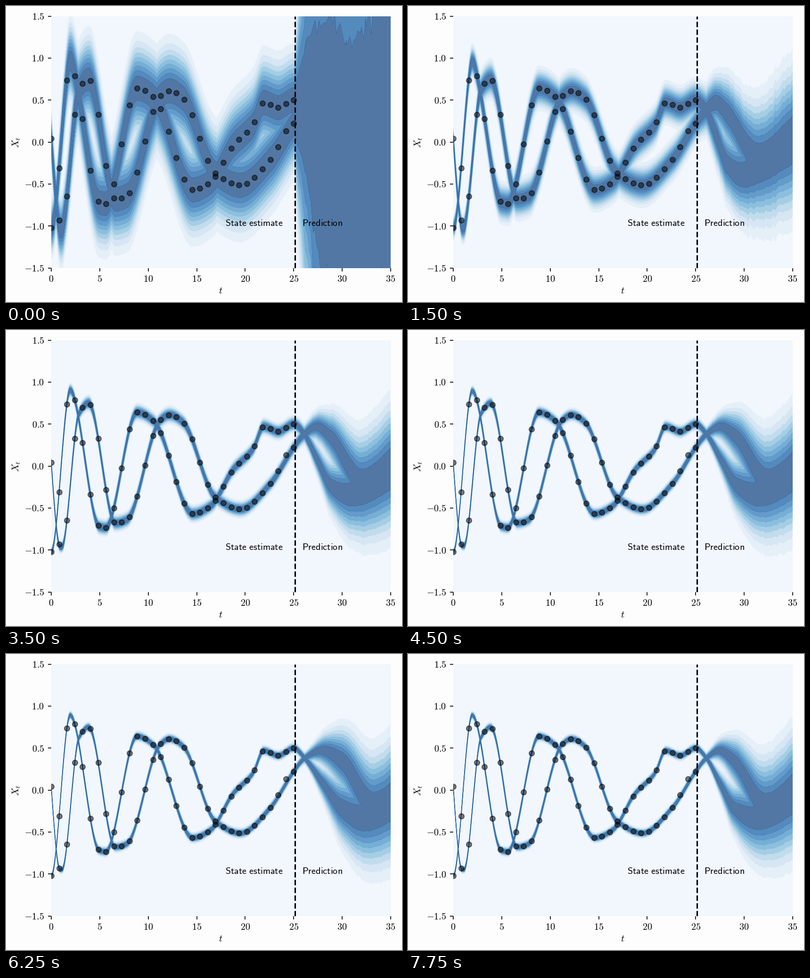
These frames come from a looping animation (840x630 px, 8000 ms). A matplotlib script:

```python
import numpy as np
import matplotlib.pyplot as plt
from matplotlib.animation import FuncAnimation
from matplotlib.collections import PolyCollection

FRAMES, STEP_MS = 32, 250
NOW, SPLIT, END = 25, 25.13, 35
LEVELS = np.arange(1, 10) / 10
plt.rcParams.update({"mathtext.fontset": "cm", "font.size": 9.7})

# Turning points (t, x) of the two tracks, then of their forecasts
TRACK_A = [(-.85, .95), (.9, -.95), (1.1, -.95), (2.85, .62), (3.85, .75),
           (6.6, -.68), (7.8, -.64), (11.2, .54), (12.2, .61), (13.6, .52),
           (16.9, -.37), (19.5, -.515), (22.6, -.21), (25, .22)]
TRACK_B = [(0, -1.02), (1.95, .89), (4.95, -.72), (5.6, -.735), (8.85, .64),
           (10.6, .53), (14.6, -.57), (16.5, -.47), (18.7, -.05), (20.8, .2),
           (21.9, .47), (23.4, .41), (25, .5)]
AHEAD_A = [(26.1, .38), (27.4, .47), (29, .34), (32.3, -.2), (38, .25)]
AHEAD_B = [(26.1, .38), (27.5, .08), (29, -.22), (31, -.33), (38, .05)]

T = np.linspace(0, END, 1441)
OBS_T = np.linspace(0, NOW, 32)
AHEAD = np.maximum(T - NOW, 0)


def curve(t, points):
    """Cubic through the points, flat at every turning point."""
    x, y = np.array(points, float).T
    h = np.diff(x)
    d = np.diff(y) / h
    slope = np.zeros_like(y)
    same = d[:-1] * d[1:] > 0
    slope[1:-1][same] = 2 / (1 / d[:-1][same] + 1 / d[1:][same])
    k = np.clip(np.searchsorted(x, t, side="right") - 1, 0, len(h) - 1)
    u = (t - x[k]) / h[k]
    return (y[k] + (y[k + 1] - y[k]) * u * u * (3 - 2 * u)
            + h[k] * u * (1 - u) * ((1 - u) * slope[k] - u * slope[k + 1]))


def bump(centre, width):
    return np.exp(-((T - centre) / width)**2)


def delayed(points, lag):
    """Shift forecast points in time, the later ones by the full lag."""
    return [(t + lag * np.clip((t - 26) / 3, 0, 1), x) for t, x in points]


def spread(i):
    """Standard deviation over time at learning step i."""
    state = (.03 + .285 * np.exp(-i / 5.5)) * (.55 + .45 * np.tanh(T / 3))
    drift = .42 * (1 - np.exp(-(AHEAD / 5.5)**2))
    untrained = ((2.8 * np.exp(-2.2 * i) + .45 * np.exp(-i / 8))
                 * (1 - np.exp(-AHEAD / 2)))
    return np.sqrt(state**2 + drift**2 + untrained**2)


def tracks(i):
    """Mean and spread of both tracks at learning step i."""
    rng = np.random.default_rng(i)
    lag = np.interp(i, [0, 16, 25, 31], [-1.2, 0, 1, 0])
    overshoot = 1 / (1 + np.exp((i - 10) / 2.5))
    mean_a = curve(T, TRACK_A + delayed(AHEAD_A, lag)) - .1 * overshoot * bump(1, .3)
    mean_b = (curve(T, TRACK_B + delayed(AHEAD_B, lag))
              + .08 * overshoot * bump(2, .4)
              - .2 * np.exp(-i / 6) * bump(29.3, 1.5))
    jitter = (.012 + .07 * np.exp(-i / 4)) * np.clip(AHEAD, 0, 1)
    grid = np.arange(NOW, END + .2, .2)
    sd = spread(i)
    return [(m, sd * np.exp(jitter * np.interp(T, grid, rng.normal(size=len(grid)))))
            for m in (mean_a, mean_b)]


def band(mean, half):
    return np.column_stack([np.r_[T, T[::-1]],
                            np.r_[mean + half, (mean - half)[::-1]]])


def tint(v):
    return .7 * np.array(plt.cm.Blues(v)[:3]) + .3


fig = plt.figure(figsize=(5.6, 4.2), dpi=150, facecolor="#fdfdfe")
ax = fig.add_axes([96 / 840, 72.5 / 630, 720 / 840, 536 / 630], facecolor="#f2f6fd")
ax.set(xlim=(0, END), ylim=(-1.5, 1.5))
ax.spines[:].set_visible(False)
xticks, yticks = np.arange(0, 36, 5), np.arange(-1.5, 1.6, .5)
ax.set_xticks(xticks, [f"${v}$" for v in xticks])
ax.set_yticks(yticks, [f"${v:.1f}$" for v in yticks])
fig.text(455.5 / 840, 1 - 606 / 630, "$t$", ha="center", va="center")
fig.text(22.5 / 840, 1 - 290 / 630, "$X_t$", rotation=90, ha="center", va="center")

# Each level: outlines first, then fills, so only the union's outline shows
layers = []
for level in LEVELS:
    outline = PolyCollection([], facecolors="none", edgecolors=[plt.cm.Blues(level)],
                             linewidths=.3, joinstyle="round", zorder=1)
    fill = PolyCollection([], facecolors=[tint(level + .05)],
                          edgecolors="none", zorder=1)
    for coll in (outline, fill):
        ax.add_collection(coll, autolim=False)
    layers.append((np.sqrt(-2 * np.log(level)), outline, fill))

for points in (TRACK_A, TRACK_B):
    ax.scatter(OBS_T, curve(OBS_T, points), s=28, c="k", alpha=.5,
               linewidths=1, zorder=3)
ax.axvline(SPLIT, color="k", ls="--", lw=1.5, zorder=4)
ax.text(17.93, -1, r"$\mathsf{State\ estimate}$", zorder=5)
ax.text(25.86, -1, r"$\mathsf{Prediction}$", zorder=5)


def update(i):
    pair = tracks(i)
    for reach, outline, fill in layers:
        verts = [band(mean, reach * sd) for mean, sd in pair]
        outline.set_verts(verts)
        fill.set_verts(verts)
    return [c for layer in layers for c in layer[1:]]


anim = FuncAnimation(fig, update, frames=FRAMES, interval=STEP_MS,
                     repeat=True, repeat_delay=0, cache_frame_data=False)
plt.show()
```
